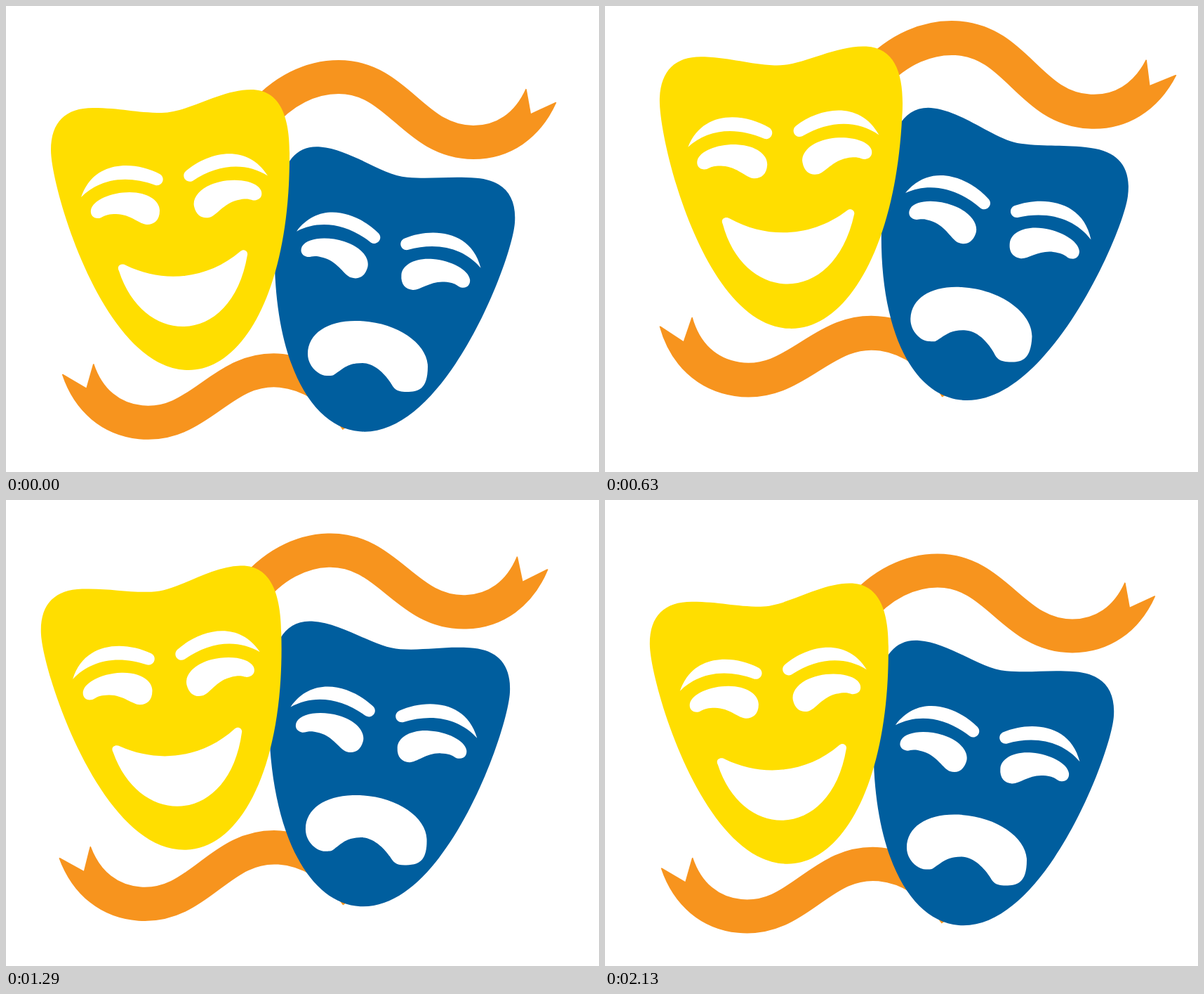
Recreate the animation shown at these times as an HTML page. Size 845 by 663 pixels, loop 2.16 s.

```html
<!DOCTYPE html>
<html lang="en">
<head>
<meta charset="utf-8">
<title>Masks</title>
<style>
  html, body { margin: 0; width: 100%; height: 100%; overflow: hidden; background: #fff; }
  svg { display: block; width: 845px; height: 663px; }

  #masks {
    --sine: cubic-bezier(.37, 0, .63, 1);
    transform-origin: 50% 90%;
    transform-box: view-box;
    animation: hop 2160ms var(--sine) infinite,
               sway 2160ms var(--sine) infinite,
               swell 1080ms var(--sine) infinite;
  }
  .band { fill: none; stroke: #f7941e; stroke-width: 48; }
  .happy { fill: #ffde00; }
  .sad { fill: #005e9e; }
  .hole { fill: #fff; }

  @keyframes hop {
    /* the second hop takes off a little faster */
    50% { translate: 0 0; animation-timing-function: cubic-bezier(.3, 0, .46, 1); }
    0%, 100% { translate: 0 0; }
    25%, 75% { translate: 0 -53px; }
  }
  @keyframes sway {
    0%, 100% { rotate: 0deg; }
    25% { rotate: 3deg; }
    75% { rotate: -3deg; }
  }
  @keyframes swell {
    0%, 100% { scale: 1; }
    50% { scale: 1.02; }
  }
</style>
</head>
<body>
<svg viewBox="0 0 845 663">
  <defs>
    <g id="ribbon">
      <path class="band" d="M360 161C394 119 436 101 474 101C559 101 581 194 666 194C708 194 743 171 762.500 127.500"/>
      <path class="hole" d="M748 153L741 114L787 135Z"/>
    </g>

    <!-- brow and eye of one side; the other side is its mirror image -->
    <g id="side" class="hole">
      <path d="M107 272C125 219 182 220 219 239C228 244 223 257 213 255C170 239 132 247 107 272Z"/>
      <path d="M121 290C124 276 150 265 176 265S219 277 219 291 211 311 201 311
        177 296 157 296 139 302 131 302 120 296 121 290Z"/>
    </g>

    <g id="face">
      <path d="M64 205C64 165 85 145 124 145S185 152 222 152 305 119 349 119 405 162 404 215
        C404 400 340 518 260 518C140 518 64 260 64 205Z"/>
      <use href="#side"/>
      <use href="#side" transform="translate(416 -47.500) rotate(-13) scale(-1 1)"/>
    </g>
  </defs>

  <g id="masks">
    <use href="#ribbon"/>
    <use href="#ribbon" transform="translate(102.500 516.500) rotate(5.700) scale(-1 1) translate(-762.500 -127.500)"/>

    <use href="#face" class="sad" transform="translate(805.500 110.400) rotate(4.700) scale(-1 1)"/>
    <path class="hole" d="M430 495C430 466 458 448 498 448C555 448 601 480 601 513S587 549 571 549
      553 544 548 536 527 508 508 508 483 514 474 520 468 526 457 526 430 513 430 495Z"/>

    <use href="#face" class="happy"/>
    <path class="hole" d="M171 369C225 395 287 389 334 349C339 345 345 349 344 354
      C322 486 196 486 161 377C157 370 164 365 171 369Z"/>
  </g>
</svg>
</body>
</html>
```
